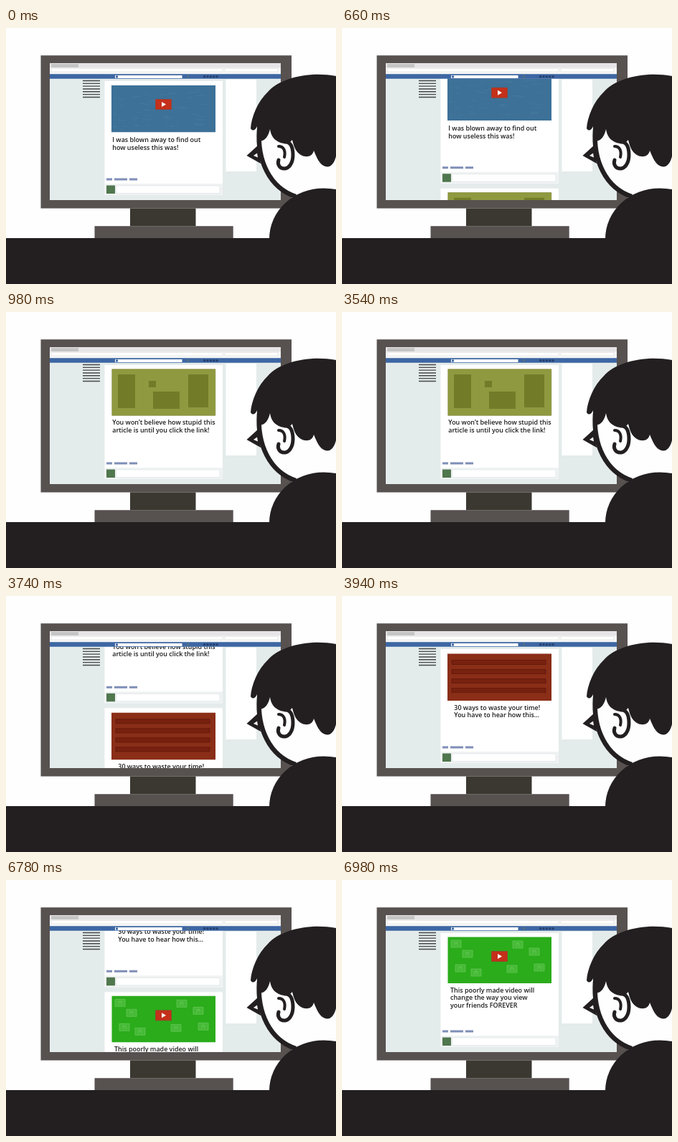
Recreate the animation shown at these times as an HTML page. Size 460 px wide and 357 px high, loop 8 s.

```html
<!DOCTYPE html>
<html lang="en">
<head>
<meta charset="utf-8">
<title>Endless feed</title>
<style>
  html, body { margin: 0; width: 100%; height: 100%; overflow: hidden; background: #fefefe; }
  svg { display: block; width: 100%; height: 100%; }
  text { font: 600 8.95px "Open Sans", "Noto Sans", sans-serif; fill: #1c1c1c; }
</style>
</head>
<body>
<svg viewBox="0 0 460 357">
  <defs>
    <clipPath id="page"><path d="M61 70.5H383V240H61Z"/></clipPath>
    <g id="card">
      <path fill="#fff" stroke="#e6ebeb" d="M137 73.500H302.500V233.500H137Z"/>
      <path fill="#7f8eb8" d="M140 209.500h8v3h-8zM151 209.500h18v3h-18zM172 209.500h11v3h-11z"/>
      <path fill="#f0f3f3" d="M138 217H302V233H138Z"/>
      <path fill="#50774e" d="M140 219.500h12v11.500h-12z"/>
      <path fill="#fff" stroke="#dfe3e3" stroke-width=".7" d="M153.500 220H298V230.500H153.500Z"/>
    </g>
    <g id="play">
      <path fill="#c5301a" stroke="#95402f" stroke-width=".8" d="M208.500 99.500h22v14h-22z"/>
      <path fill="#fff" d="M217 103l6 3.500-6 3.500z"/>
    </g>
  </defs>

  <!-- monitor -->
  <path fill="#575150" d="M48.500 38.300H398V251.400H48.500ZM123.500 276.300H316.700V293H123.500Z"/>
  <path fill="#3b3731" d="M173 251.400H264.500V276.300H173Z"/>
  <path fill="#e4ebeb" d="M61 49H383V240H61Z"/>

  <!-- page -->
  <path fill="#fff" d="M306.500 72H349V200H306.500Z"/>
  <path stroke="#454747" stroke-width="1.400" d="M107 73.500h24m-24 3.830h24m-24 3.830h24m-24 3.830h24m-24 3.830h24m-24 3.830h24m-24 3.830h24"/>
  <g clip-path="url(#page)">
    <g id="feed">
      <g>
        <use href="#card"/>
        <path fill="#3d7198" d="M147 80H292V145.300H147Z"/>
        <path id="grain" stroke="#5488a6" stroke-width=".7" opacity=".5"/>
        <use href="#play"/>
        <text x="148.300" y="159.300">I was blown away to find out</text>
        <text x="148.300" y="169.800">how useless this was!</text>
      </g>
      <g transform="translate(0 166)">
        <use href="#card"/>
        <path fill="#8f993f" stroke="#818b3b" stroke-width=".7" d="M147.800 79.800H291.800V144.300H147.800Z"/>
        <path fill="#727b28" d="M156 87h24v47h-24zM199 96h10v9h-10zM205 111h37v24h-37zM254 87h28v46h-28z"/>
        <text x="148.300" y="157.300">You won’t believe how stupid this</text>
        <text x="148.300" y="167.800">article is until you click the link!</text>
      </g>
      <g transform="translate(0 332)">
        <use href="#card"/>
        <path fill="#8a2e18" d="M147 80.500H292V146H147Z"/>
        <path fill="#78210f" stroke="#5f190b" stroke-width=".8" d="M153 89.500h131v6h-131zM153 102.500h131v6h-131zM153 115.500h131v6h-131zM153 128.500h131v6h-131z"/>
        <text x="156.300" y="158.700">30 ways to waste your time!</text>
        <text x="156.300" y="169.200">You have to hear how this…</text>
      </g>
      <g transform="translate(0 498)">
        <use href="#card"/>
        <path fill="#2bac1b" d="M147.500 79.500H292V144H147.500Z"/>
        <g id="tiles" fill="#45ba36" stroke="#68c95b" stroke-width=".7"></g>
        <use href="#play"/>
        <text x="151" y="156.700">This poorly made video will</text>
        <text x="151" y="167.200">change the way you view</text>
        <text x="151" y="177.700">your friends FOREVER</text>
      </g>
    </g>
  </g>

  <!-- browser -->
  <path fill="#e6e4e6" d="M61 49H383V55.500H61Z"/>
  <path fill="#c5c5c5" d="M63 50H101V55H63Z"/>
  <path fill="#f5f6f6" d="M61 55.500H383V64.300H61Z"/>
  <path fill="#fff" stroke="#dedede" stroke-width=".6" d="M63 56.500H302V61H63ZM305 56.500H379V61H305Z"/>
  <path fill="#3d66a3" d="M61 64.300H383V70.700H61Z"/>
  <path fill="#fff" d="M152 66H245.500V70H152Z"/>
  <path fill="#3d66a3" d="M153 66.500h3v3h-3z"/>
  <path fill="#52727a" d="M252 66h3v3h-3z"/>
  <path stroke="#23406f" stroke-width="3" stroke-dasharray="3 1.400" d="M275 67.800H296"/>

  <!-- viewer -->
  <path fill="#fefefe" d="M353 145C351 186 368 226 405 236L460 240V110H365Z"/>
  <path fill="none" stroke="#231f20" stroke-width="6.500" d="M353 142C350 184 367 223 404 235"/>
  <path fill="#231f20" d="M335.500 178L352 163L355 189Z"/>
  <path fill="#fefefe" d="M345 178L350 174.500L351 180.500Z"/>
  <path fill="#231f20" d="M341 140C342 125 350 103 366 88C382 71 420 60 460 67V179C457 191 451 195 445 193C437 191 433 180 429 171C427 180 418 181 411 177C404 173 401 165 399 156C394 163 384 162 377 157C371 153 369 147 368 141C366 150 362 157 354 158L350 157V137C348 142 344 145 341 140Z"/>
  <path fill="#fefefe" stroke="#231f20" stroke-width="5" stroke-linecap="round" d="M389 159C397 158 400 167 400 177C400 189 394 196 388 196C381 196 378 190 380 184"/>
  <path fill="none" stroke="#231f20" stroke-width="4" stroke-linecap="round" d="M380 165C387 165 390 171 388 180"/>
  <path fill="#231f20" d="M367 294A76 70.600 0 0 1 443 223.400Q452 223.400 460 225V294ZM0 293H460V357H0Z"/>
</svg>
<script>
  const $ = id => document.getElementById(id);

  let seed = 7;
  const rand = () => (seed = seed * 16807 % 2147483647) / 2147483647;
  let strokes = '';
  for (let i = 0; i < 50; i++)
    strokes += `M${149 + rand() * 128} ${83 + rand() * 59}h${3 + rand() * 10}`;
  $('grain').setAttribute('d', strokes);

  const spots = [[159, 89], [175, 103], [245, 90], [268, 100],
                 [165, 123], [187, 129], [237, 124], [275, 122]];
  $('tiles').innerHTML = spots.map(([x, y]) =>
    `<path d="M${x - 7} ${y - 5}h14v10h-14zm5 8v-4h4v4m-4 -5h4"/>`).join('');

  const LOOP = 8000, STEP = 166, GLIDE = 400;
  const starts = [580, 3540, 6580];
  const ease = t => (1 - Math.cos(Math.PI * t)) / 2;
  const progress = (t, start) => ease(Math.min(1, Math.max(0, (t - start) / GLIDE)));

  const t0 = performance.now();
  function draw(now) {
    const t = Math.max(0, now - t0) % LOOP;
    const y = STEP * starts.reduce((sum, start) => sum + progress(t, start), 0);
    $('feed').setAttribute('transform', `translate(0 ${-y})`);
    requestAnimationFrame(draw);
  }
  draw(t0);
</script>
</body>
</html>
```
